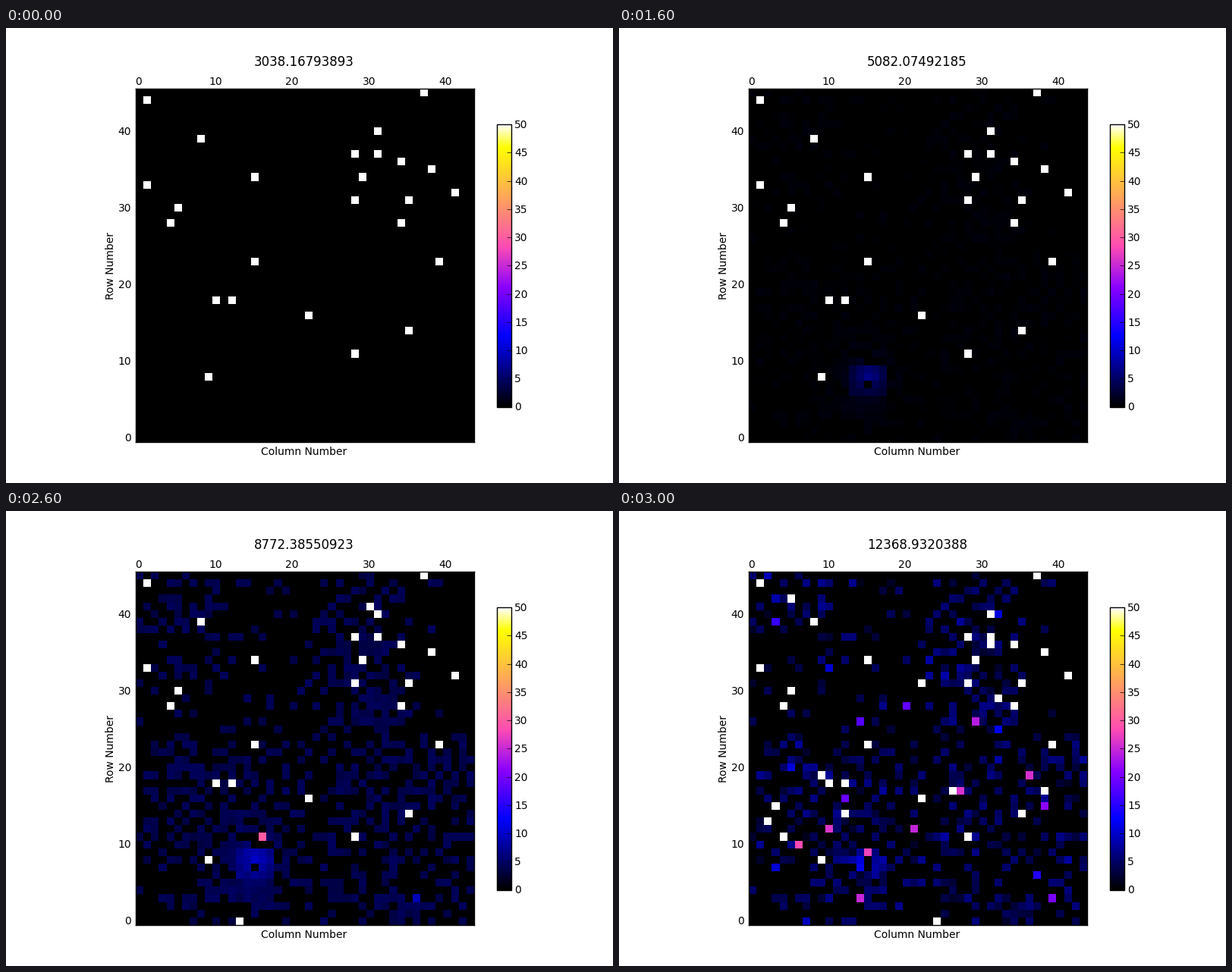
Animation of 800 by 600 pixels, one loop 3100 ms. Source, as a matplotlib script:

```python
import numpy as np
import matplotlib.pyplot as plt
from matplotlib.animation import FuncAnimation

W, H, DPI = 800, 600, 100
COLS, ROWS = 44, 46
FRAMES = 31
VMAX = 50

plt.rcParams.update({"font.family": "DejaVu Sans", "font.size": 10,
                     "axes.linewidth": 1.0})

# Bin centres of a spectrum whose edges are evenly spaced in energy.
edges = 1 / np.linspace(1 / 3000, 1 / 13000, FRAMES + 1)
centres = (edges[:-1] + edges[1:]) / 2

# Cells that stay saturated: (column, row).
HOT = [(1, 44), (37, 45), (8, 39), (31, 40), (28, 37), (31, 37), (34, 36),
       (38, 35), (15, 34), (29, 34), (1, 33), (41, 32), (5, 30), (28, 31),
       (35, 31), (4, 28), (34, 28), (15, 23), (39, 23), (10, 18), (12, 18),
       (22, 16), (35, 14), (28, 11), (9, 8)]

row, col = np.mgrid[:ROWS, :COLS]


def bump(c, r, sc, sr):
    return np.exp(-((col - c) / sc) ** 2 / 2 - ((row - r) / sr) ** 2 / 2)


def box(c0, c1, r0, r1):
    return (col >= c0) & (col <= c1) & (row >= r0) & (row <= r1)


def sigmoid(x):
    return 1 / (1 + np.exp(-x))


# Working cells crowd around a few centres.
rng = np.random.default_rng(12)
density = (0.14 + 0.55 * bump(29, 35, 3.5, 7) + 0.38 * bump(31, 18, 6, 6)
           + 0.38 * bump(13, 6, 4, 5) + 0.40 * bump(9, 16, 6, 6)
           + 0.36 * bump(4, 41, 3.5, 5) + 0.25 * bump(40, 16, 3, 6)
           + 0.32 * bump(31, 3, 6, 3))
density[box(35, 43, 24, 43)] *= 0.35
density[box(10, 22, 24, 43)] *= 0.7
live = rng.random((ROWS, COLS)) < density
live |= box(13, 17, 3, 9) | box(11, 12, 8, 9)
live[[7, 10], 15] = False
cells = np.argwhere(live)
weight = rng.uniform(0.55, 1.35, (ROWS, COLS))
order = rng.random((ROWS, COLS))
jitter = rng.normal(0, 1, (ROWS, COLS))

core = (0.65 * bump(15.2, 8.3, 1.1, 0.9) + 0.25 * box(13, 17, 6, 9)
        + 0.25 * bump(15, 7.5, 2.2, 2.5))


def flash(grid, n):
    """Short-lived bright cells, ever more of them near the end."""
    count = max(n - 24, 0) ** 2
    dice = np.random.default_rng(100 + n)
    for r, c in dice.choice(cells, count, replace=False):
        white = dice.random() < 0.25
        grid[r, c] = VMAX if white else 8 + 24 * dice.random() ** 1.5


def field(n):
    rise = sigmoid(1.2 * (n - 25.4))
    late = max(n - 27, 0) / 3
    level = 0.03 * n + 4.8 * rise - late
    glow = 5.6 * sigmoid((n - 8.5) / 1.8)
    even = 0.85 * rise - 0.5 * late
    grid = level * (even + (1 - even) * weight) + glow * core
    grid = np.clip(grid * (1 + 0.25 * late * jitter), 0, VMAX)
    grid = np.where(live & (order < 1 - 0.25 * late), grid, 0)
    flash(grid, n)
    for c, r in HOT:
        grid[r, c] = VMAX
    return grid


fig = plt.figure(figsize=(W / DPI, H / DPI), dpi=DPI, facecolor="white")


def axes(x, y, w, h):
    return fig.add_axes([x / W, y / H, w / W, h / H])


def label(x, y, text, ha="center", **kw):
    return fig.text(x / W, y / H, text, ha=ha, va="baseline", **kw)


X0, Y0, SIDE = 171, 54, 465
CELL = SIDE / ROWS
MID = X0 + CELL * COLS / 2
ax = axes(X0, Y0, 446, 466)
image = ax.imshow(field(0), cmap="gnuplot2", vmin=0, vmax=VMAX,
                  origin="lower", interpolation="nearest", aspect="auto")
ticks = range(0, 50, 10)
ax.set_xticks(ticks)
ax.set_yticks(ticks)
ax.tick_params(direction="in", length=4, width=0.5, top=True, right=True,
               labelbottom=False, labelleft=False)
for t in ticks:
    step = (t + 0.5) * CELL
    label(X0 + step - 1.1, 524.6, str(t))
    label(X0 - 5.8, Y0 + step - 4.4, str(t), "right")

BAR_Y, BAR_H = 100.5, 372.4
bar_ax = axes(647, BAR_Y, 18.6, BAR_H)
bar = fig.colorbar(image, cax=bar_ax, ticks=range(0, VMAX + 1, 5))
bar.outline.set_linewidth(1.0)
bar_ax.tick_params(direction="in", length=4, width=0.5, labelright=False)
for t in range(0, VMAX + 1, 5):
    label(670, BAR_Y + BAR_H * t / VMAX - 5, str(t), "left")

label(MID - 0.9, 37, "Column Number")
label(141.5, Y0 + SIDE / 2, "Row Number", rotation=90, rotation_mode="anchor")
title = label(MID - 0.5, 549.5, "", fontsize=12)


def draw(n):
    image.set_data(field(n))
    title.set_text("%.12g" % centres[n])
    return image, title


anim = FuncAnimation(fig, draw, frames=FRAMES, interval=100, repeat=True)
plt.show()
```
